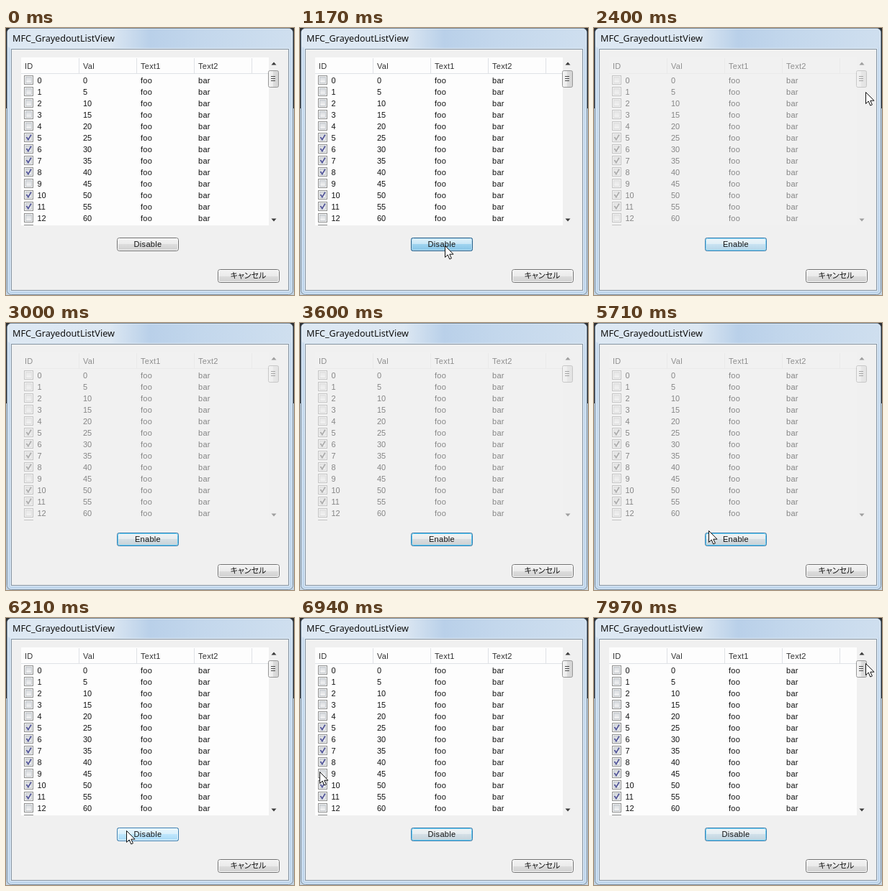
An HTML page for the animation above (8000 ms loop, 400 px wide and 372 px high).

```html
<!DOCTYPE html>
<html lang="ja">
<head>
<meta charset="utf-8">
<title>List view</title>
<style>
html, body { margin: 0; width: 100%; height: 100%; overflow: hidden; background: #f0f0f0; }
svg { display: block; width: 400px; height: 372px; }
text { font: 11px "Liberation Sans", Arial, sans-serif; fill: #111; }
.word { letter-spacing: .3px; }
.title { font: 12.6px "Noto Sans", sans-serif; }
.kana { font: 11px "Noto Sans CJK JP", "Noto Sans CJK", sans-serif; font-feature-settings: "palt"; }
.mid { text-anchor: middle; }
.head text { fill: #333; }
.off text { fill: #858585; }
.off .head text { fill: #8f8f8f; }
.off .paper { fill: #f1f1f1; }
.off .dim { opacity: .45; filter: grayscale(1); }
</style>
</head>
<body>
<svg id="stage" viewBox="0 0 400 372">
  <defs>
    <clipPath id="view"><rect x="21" y="41" width="344" height="234"/></clipPath>
  </defs>
</svg>
<script>
const LOOP = 8000;
const stage = document.getElementById('stage');

function add(parent, tag, attrs = {}, text = '') {
  const el = document.createElementNS('http://www.w3.org/2000/svg', tag);
  for (const k in attrs) el.setAttribute(k, attrs[k]);
  el.textContent = text;
  parent.append(el);
  return el;
}
const rect = (parent, x, y, width, height, fill, more) =>
  add(parent, 'rect', { x, y, width, height, fill, ...more });
const path = (parent, d, more) => add(parent, 'path', { d, fill: 'none', ...more });
const label = (parent, x, y, text, cls = 'word') => add(parent, 'text', { x, y, class: cls }, text);

function gradient(id, stops, across = false) {
  const g = add(stage.querySelector('defs'), 'linearGradient',
    across ? { id } : { id, x2: 0, y2: 1 });
  for (const [offset, color] of stops) add(g, 'stop', { offset, 'stop-color': color });
  return `url(#${id})`;
}
// Two-tone glossy face with a break in the middle
const gloss = (id, [a, b, c, d], across) =>
  gradient(id, [[0, a], [.5, b], [.5, c], [1, d]], across);

const glass = gradient('glass', [[0, '#d3e1ef'], [.1, '#c8dbee'], [1, '#c0d6ec']]);
const sheen = gradient('sheen',
  [[0, '#dde8f3'], [.36, '#dce7f2'], [.5, '#b9d0e9'], [.68, '#c3d7ec'], [1, '#cfdfef']], true);
const face = gloss('face', ['#f3f3f3', '#ebebeb', '#dddddd', '#cfcfcf']);
const hotFace = gloss('hot', ['#eaf6fd', '#d9f0fc', '#bee6fd', '#a7d9f5']);
const downFace = gloss('down', ['#e2f2fb', '#c6e5f6', '#9ed3f0', '#86c4e6']);
const thumbFace = gloss('thumb', ['#f6f6f6', '#eaeaea', '#dcdcdc', '#d2d2d2'], true);
const boxFace = gradient('box', [[0, '#d6d9dd'], [1, '#f6f6f6']]);

// Window frame
rect(stage, 0, 0, 400, 372, '#c3d3e2');
rect(stage, 0, 0, 400, 112, '#2b2e32');
rect(stage, 1.5, .5, 397, 371, glass, { rx: 6, stroke: '#75889a' });
rect(stage, 2, 1, 396, 27, sheen, { rx: 5 });
rect(stage, 2.5, 1.5, 395, 369, 'none', { rx: 5, stroke: '#f2f8fd', 'stroke-opacity': .45 });
rect(stage, 6.5, 28.5, 387, 338, 'none', { stroke: '#dfebf6' });
rect(stage, 7.5, 29.5, 385, 336, '#f0f0f0', { stroke: '#8593a1' });
label(stage, 9, 19, 'MFC_GrayedoutListView', 'title');

// List
const list = add(stage, 'g');
rect(list, 21, 41, 344, 234, '#fdfdfd', { class: 'paper' });
const rows = add(list, 'g', { 'clip-path': 'url(#view)' });
const ticks = [];
for (let i = 0; i < 14; i++) {
  const y = 66 + 16 * i;
  const box = add(rows, 'g', { class: 'dim' });
  rect(box, 25.5, y + .5, 12, 12, '#f6f6f6', { stroke: '#8e8f8f' });
  rect(box, 27.5, y + 2.5, 8, 8, boxFace, { stroke: '#c3c8cd' });
  ticks.push(path(box, `M28.5 ${y + 6}l2.3 3.6 4.2 -7`, { stroke: '#54579a', 'stroke-width': 1.8 }));
  label(rows, 43.5, y + 11, i, 'num');
  label(rows, 107, y + 11, i * 5, 'num');
  label(rows, 187, y + 11, 'foo');
  label(rows, 267, y + 11, 'bar');
}
const head = add(list, 'g', { class: 'head' });
path(head, 'M21 63.5H365M101.5 42V63M181.5 42V63M261.5 42V63M341.5 42V63',
  { stroke: '#dfe2e6', class: 'dim' });
['ID', 'Val', 'Text1', 'Text2'].forEach((name, i) => label(head, i ? 27 + 80 * i : 26, 57, name));

// Scroll bar
const bar = add(list, 'g', { class: 'dim' });
rect(bar, 365, 41, 14, 234, '#f0f0f0');
path(bar, 'M368.5 51.5l3.5 -4 3.5 4zM368.5 265.5l3.5 4 3.5 -4z', { fill: '#3c3c3c' });
rect(bar, 364.5, 59.5, 14, 23, thumbFace, { rx: 2, stroke: '#979797' });
path(bar, 'M368 67.5h6M368 70.5h6M368 73.5h6', { stroke: '#4c4c4c' });

// Buttons
function button(x, y, fill, stroke, ring = '#fcfcfc') {
  const g = add(stage, 'g');
  rect(g, x + .5, y + .5, 85, 18, fill, { rx: 3, stroke });
  rect(g, x + 1.5, y + 1.5, 83, 16, 'none', { rx: 2, stroke: ring });
  return g;
}
button(294, 336, face, '#707070');
label(stage, 336.5, 349, 'キャンセル', 'kana mid');
button(154, 292, face, '#707070');
const focus = button(154, 292, face, '#3c7fb1', '#48c6f3');
const glow = button(154, 292, hotFace, '#3c7fb1', '#a5def5');
const hot = button(154, 292, hotFace, '#3c7fb1', '#eefaff');
const down = button(154, 292, downFace, '#2c628b', '#b5dcf0');
const caption = label(stage, 197, 305, '', 'word mid');

const cursor = path(stage, 'M-.5 -.5V15.5L3.2 12 5.8 18 8.4 16.9 5.8 11.2H11Z',
  { fill: '#fff', stroke: '#111' });

// Time, x, y; null starts a stretch without the pointer
const route = [
  [0, null], [400, 260, 371], [900, 202, 304], [2040, 202, 304], [2400, 378, 90],
  [2600, 377, 73], [2800, 378, 78], [2840, null],
  [3700, 2, 240], [4100, 26, 224], [4500, 30, 221], [4700, 30, 222], [5040, 64, 240],
  [5400, 148, 307], [5710, 160, 290], [5880, 168, 297], [6300, 168, 297], [6670, 28, 216],
  [6940, 28, 215], [7200, 28, 215], [7550, 346, 79], [7750, 386, 58], [7960, 378, 64], [LOOP, 378, 64]
];

const ramp = (t, from, length) => Math.min(1, Math.max(0, (t - from) / length));
const pulse = (t, from, to, rise = 200) => ramp(t, from, rise) * (1 - ramp(t, to, rise));
const smooth = u => u * u * (3 - 2 * u);

function pointer(t) {
  const i = route.findLastIndex(p => p[0] <= t);
  const [t0, x0, y0] = route[i];
  if (x0 === null) return null;
  const [t1, x1, y1] = route[i + 1];
  if (x1 === null) return [x0, y0];
  const u = smooth((t - t0) / (t1 - t0));
  return [x0 + (x1 - x0) * u, y0 + (y1 - y0) * u];
}

function draw(t) {
  const off = t >= 1300 && t < 6150;
  list.setAttribute('class', off ? 'off' : '');
  caption.textContent = off ? 'Enable' : 'Disable';
  ticks.forEach((tick, i) => {
    const on = (i >= 5 && i <= 8) || i === 10 || i === 11 || (i === 9 && t >= 7050);
    tick.setAttribute('visibility', on ? 'visible' : 'hidden');
  });

  const focused = t >= 1170 ? 1 : 0;
  focus.setAttribute('opacity', focused);
  glow.setAttribute('opacity', focused * (.33 + .33 * Math.cos((t - 2400) * Math.PI / 1000)));
  hot.setAttribute('opacity', Math.max(pulse(t, 780, 2100), pulse(t, 5700, 6400)));
  down.setAttribute('opacity', Math.max(pulse(t, 1130, 1300, 40), pulse(t, 5990, 6150, 40)));

  const at = pointer(t);
  cursor.setAttribute('visibility', at ? 'visible' : 'hidden');
  if (at) cursor.setAttribute('transform', `translate(${at.map(Math.round)})`);
}

const start = performance.now();
function frame() {
  draw((performance.now() - start) % LOOP);
  requestAnimationFrame(frame);
}
frame();
</script>
</body>
</html>
```
